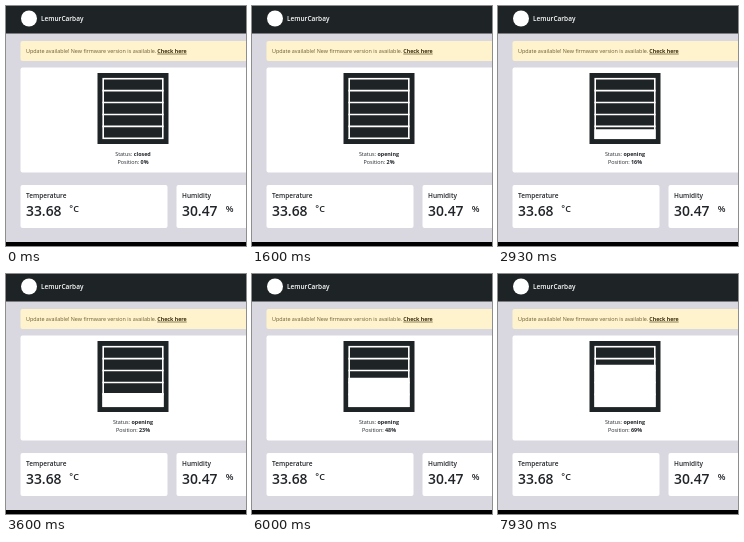
Animation of 240x240 px, one loop 8 s. Source, as an HTML page with a canvas:

```html
<!DOCTYPE html>
<html lang="en">
<head>
<meta charset="utf-8">
<title>Garage door</title>
<style>
html, body { margin: 0; width: 100%; height: 100%; overflow: hidden; background: #d9d8e0; }
canvas { display: block; width: 240px; height: 240px; }
</style>
</head>
<body>
<canvas id="stage"></canvas>
<script>
const SIZE = 240, LOOP = 8000, OPENING_AT = 800;
const DARK = '#1e2325', PAGE = '#d9d8e0', INK = '#212529';
const FONT = '"Open Sans", "Noto Sans", sans-serif';

// Door position: [time in ms, percent open]
const travel = [[800, 1], [1500, 1], [2270, 9], [3600, 23], [4670, 34], [6000, 48], [7930, 69]];

const canvas = document.getElementById('stage');
const ctx = canvas.getContext('2d');
const scale = window.devicePixelRatio || 1;
canvas.width = canvas.height = Math.round(SIZE * scale);

function doorPosition(t) {
  if (t < OPENING_AT) return 0;
  for (let i = 1; i < travel.length; i++) {
    const [t0, p0] = travel[i - 1], [t1, p1] = travel[i];
    if (t <= t1) return Math.round(p0 + (p1 - p0) * (t - t0) / (t1 - t0));
  }
  return travel[travel.length - 1][1];
}

function box(x, y, w, h, color, radius = 0) {
  ctx.fillStyle = color;
  ctx.beginPath();
  ctx.roundRect(x, y, w, h, radius);
  ctx.fill();
}

function text(str, x, y, size, color = INK, weight = 400) {
  ctx.font = `${weight} ${size}px ${FONT}`;
  ctx.fillStyle = color;
  ctx.fillText(str, x, y);
  return ctx.measureText(str).width;
}

function labelled(label, value, cx, y, size) {
  ctx.font = `400 ${size}px ${FONT}`;
  const labelWidth = ctx.measureText(label).width;
  ctx.font = `700 ${size}px ${FONT}`;
  const x = cx - (labelWidth + ctx.measureText(value).width) / 2;
  text(label, x, y, size);
  text(value, x + labelWidth, y, size, INK, 700);
}

function header() {
  box(0, 0, SIZE, 27.5, DARK);
  ctx.fillStyle = '#fff';
  ctx.beginPath();
  ctx.arc(23, 12.5, 8, 0, Math.PI * 2);
  ctx.fill();
  text('LemurCarbay', 35, 15.3, 6.5, '#fff', 600);
}

function notice() {
  box(14.5, 35, 240, 20, '#fff3cd', 2);
  text('Update available! New firmware version is available.', 20, 47, 5.4, '#6c5d30');
  const w = text('Check here', 151.3, 47, 5.3, '#3a2f0c', 700);
  box(151.3, 47.7, w, 0.6, '#3a2f0c');
}

function door(percent) {
  const x = 96.4, y = 71.9, side = 61.2, line = 1.6;
  const pitch = (side - line) / 5;
  box(91.5, 67, 71, 71, DARK);
  ctx.strokeStyle = '#fff';
  ctx.lineWidth = line;
  ctx.strokeRect(x + line / 2, y + line / 2, side - line, side - line);
  for (let i = 1; i < 5; i++) box(x, y + i * pitch, side, line, '#fff');
  const gap = side * percent / 100;
  box(x, y + side - gap, side, gap, '#fff');
}

function reading(x, w, title, value, unit, unitX) {
  box(x, 179, w, 43, '#fff', 2);
  text(title, x + 5.5, 192, 6.5, INK, 600);
  text(value, x + 5.5, 210.4, 13.9, INK, 600);
  text(unit, unitX, 206, 9, INK, 600);
}

function draw(t) {
  const percent = doorPosition(t);
  ctx.setTransform(scale, 0, 0, scale, 0, 0);
  box(0, 0, SIZE, SIZE, PAGE);
  header();
  notice();
  box(14.5, 61.5, 240, 105, '#fff', 2);
  door(percent);
  labelled('Status: ', t < OPENING_AT ? 'closed' : 'opening', 127, 149.7, 5.4);
  labelled('Position: ', percent + '%', 127, 158.2, 5.4);
  reading(14.5, 147, 'Temperature', '33.68', '°C', 63.3);
  reading(170.5, 90, 'Humidity', '30.47', '%', 219.8);
  box(0, 236, SIZE, 4, '#000');
}

const start = performance.now();
function tick() {
  draw((performance.now() - start) % LOOP);
  requestAnimationFrame(tick);
}
tick();
</script>
</body>
</html>
```
